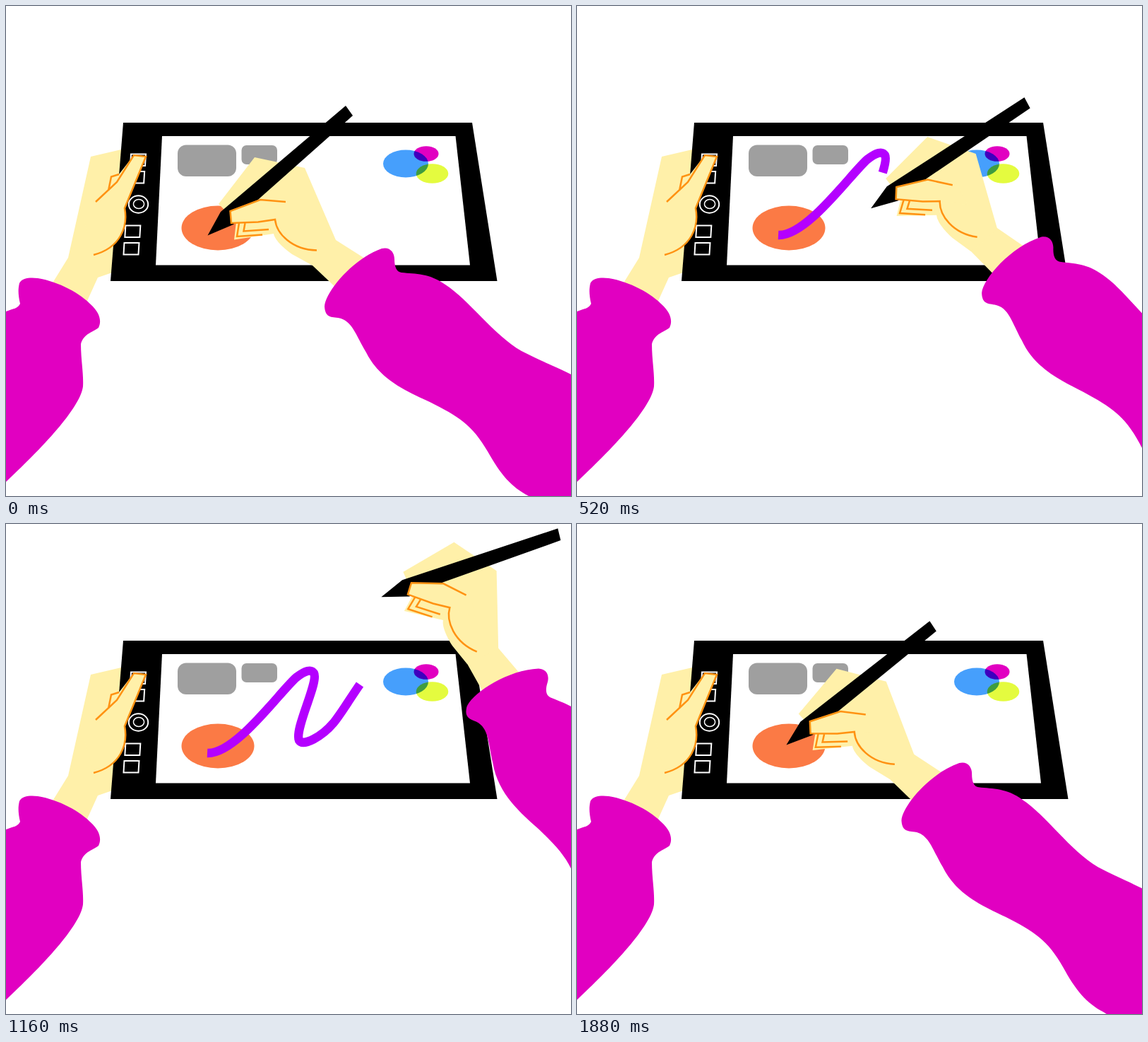
An HTML page that plays this animation: 800x693 px, repeating every 1.92 s.

```html
<!DOCTYPE html>
<html lang="en">
<head>
<meta charset="utf-8">
<title>Drawing on a tablet</title>
<style>
  html, body { margin: 0; width: 100%; height: 100%; overflow: hidden; background: #fff; }
  svg { display: block; width: 100vw; height: 100vh; }
  .skin { fill: #fff0a9; }
  .cloth { fill: #e100c1; }
  .crease { fill: none; stroke: #ff9212; stroke-width: 2.5; }
  .keys { fill: none; stroke: #fff; stroke-width: 2; }
  .blend ellipse { mix-blend-mode: multiply; }
</style>
</head>
<body>
<svg viewBox="0 0 800 693">
  <g class="tap">
    <path class="skin" d="M120 213L163 203H200V360L130 384L110 428L62 398L88 356Z"/>
  </g>

  <!-- tablet -->
  <path d="M166 165H660L695.5 389H148Z"/>
  <path fill="#fff" d="M221 184H636.5L657 366.5H212Z"/>
  <g class="keys">
    <path id="key" d="M1 0H22L21 16.5H0Z"/>
    <ellipse cx="187.5" cy="280.5" rx="13.7" ry="12.2"/>
    <ellipse cx="188" cy="280" rx="7.6" ry="6.6" stroke-width="1.5"/>
  </g>

  <!-- picture on the screen -->
  <g fill="#9f9f9f">
    <rect x="243" y="196.5" width="83" height="44.5" rx="12"/>
    <rect x="333.5" y="197" width="50.5" height="27" rx="7"/>
  </g>
  <ellipse cx="300" cy="314" rx="51.5" ry="31.5" fill="#fb7a45"/>
  <g class="blend">
    <ellipse cx="566" cy="223" rx="32" ry="19.5" fill="#469ffc"/>
    <ellipse cx="595" cy="209" rx="17.5" ry="10.8" fill="#e100c1"/>
    <ellipse cx="603.5" cy="237" rx="22.8" ry="13.8" fill="#e4fb3f"/>
  </g>
  <path id="ink" fill="none" stroke="#b400ff" stroke-width="12.4" pathLength="1"
    d="M285 324C325 326 387 238 411 217C424 207 432 205 436 211C443 224 408 290 415 306C421 315 447 301 464 281C476 266 487 247 501 227"/>

  <!-- left hand -->
  <g class="tap">
    <path class="skin" d="M181 211L198 213L168 286C173 312 162 342 124 352L110 300L145 261L149 241L160 238Z"/>
    <path class="crease" d="M127 277L157 249L181 211L198 213L168 286C173 312 162 342 124 352M160 238L149 241.5L145 261"/>
  </g>
  <path class="cloth" d="M0 432C10 428 17 428 20 421C17 408 17 400 19 392C23 384 35 384 45 385C75 390 105 406 122 424C134 436 135 447 131 455C124 461 110 463 106 478C106 500 110 520 109 538C106 565 60 617 0 673Z"/>

  <!-- right arm, hand and pen -->
  <g class="arm">
    <path class="skin" d="M455 323L467 331L530 371L490 420L434 367L425 352Z"/>
  </g>
  <g id="hand">
    <path class="skin" d="M301 280L352 214L423 229L467 331L434 367L405 351C387 338 380 328 379 322L323 330.5L326 305Z"/>
    <path d="M285.5 324.5L304 291L481 141L491 155L359 272L322 309Z"/>
    <path class="skin" d="M317.5 290L360 274L400 271L420 302H381L319 307Z"/>
    <path class="crease" d="M396 277L360 274L317.5 290L319 307L357 305.5L381 302C383 322 405 345 440 345.5"/>
    <path class="crease" d="M330 307L327 326L363 323.5M338.5 307L336.5 318.5L372 316"/>
  </g>
  <g class="arm">
    <path class="cloth" d="M451 425C452 405 490 358 532 343C544 340 550 349 550 358C550 369 553 376 560 377C580 379 600 378 622 394C655 415 690 465 730 488C755 501 780 511 800 521L900 565V715H775L740 693C715 680 700 662 682 630C660 592 640 580 600 560C570 546 530 530 510 490C495 465 490 444 470 441C458 440 452 439 451 425Z"/>
  </g>
</svg>
<script>
const LOOP = 1920, STEP = 40;
const TIP = [286, 324], WRIST = [432, 365];
const REST = [522, 98, 22];

// time, pen tip x, y, turn of the hand
const POSES = [
  [0, ...TIP, 0],
  [320, 430, 208, 13.4],
  [620, 412, 313, 3],
  [680, 421, 307, 0.6],
  [840, 459, 288, -19],
  [1000, 500, 212, -8],
  [1160, 532, 103, 22],
  [1320, ...REST],
  [1600, ...REST],
  [1720, 436, 167, 23],
  [LOOP, ...TIP, 0]
];

const clamp = v => Math.min(1, Math.max(0, v));
const smooth = v => (v = clamp(v), v * v * (3 - 2 * v));

const secant = (i, k) =>
  (POSES[i + 1][k] - POSES[i][k]) / (POSES[i + 1][0] - POSES[i][0]);

// slope that never overshoots a pose; flat at turning points
function slope(i, k) {
  if (i === 0 || i === POSES.length - 1) return 0;
  const a = secant(i - 1, k), b = secant(i, k);
  return a * b > 0 ? 2 * a * b / (a + b) : 0;
}

function poseAt(t) {
  const i = POSES.findIndex(p => p[0] > t) - 1;
  const p = POSES[i], q = POSES[i + 1], d = q[0] - p[0], u = (t - p[0]) / d;
  return p.map((v, k) => v + (q[k] - v) * smooth(u)
    + d * u * (1 - u) * ((1 - u) * slope(i, k) - u * slope(i + 1, k)));
}

const all = s => document.querySelectorAll(s);
const hand = all('#hand'), arm = all('.arm'), taps = all('.tap');
const [ink] = all('#ink'), [key] = all('#key');

// tablet keys lean along the left edge
for (const y of [209.5, 234, 310.5, 335]) {
  const copy = key.cloneNode();
  copy.removeAttribute('id');
  copy.setAttribute('transform', `translate(${176 - (y - 209.5) * 0.076} ${y})`);
  key.parentNode.append(copy);
}
key.remove();

function place(list, x, y, angle, [homeX, homeY]) {
  const value = `translate(${x} ${y}) rotate(${angle}) translate(${-homeX} ${-homeY})`;
  list.forEach(el => el.setAttribute('transform', value));
}

function draw(t) {
  const [, x, y, turn] = poseAt(t);
  place(hand, x, y, turn, TIP);

  // the arm hangs on the wrist and swings up as the wrist rises
  const a = turn * Math.PI / 180, dx = WRIST[0] - TIP[0], dy = WRIST[1] - TIP[1];
  const wx = x + dx * Math.cos(a) - dy * Math.sin(a);
  const wy = y + dx * Math.sin(a) + dy * Math.cos(a);
  place(arm, wx, wy, (WRIST[1] - wy) / 9.8, WRIST);

  // thumb presses undo
  const press = smooth((t - 1440) / 80) - smooth((t - 1560) / 120);
  place(taps, 100, 400, press * 1.5, [100, 400]);

  const drawn = smooth(t / 1000);
  ink.setAttribute('stroke-dasharray', `${drawn} 2`);
  ink.style.display = drawn > 0 && t < 1520 ? '' : 'none';
}

const start = performance.now();
function tick() {
  const t = (performance.now() - start) % LOOP;
  draw(Math.floor(t / STEP) * STEP);
  requestAnimationFrame(tick);
}
draw(0);
requestAnimationFrame(tick);
</script>
</body>
</html>
```
